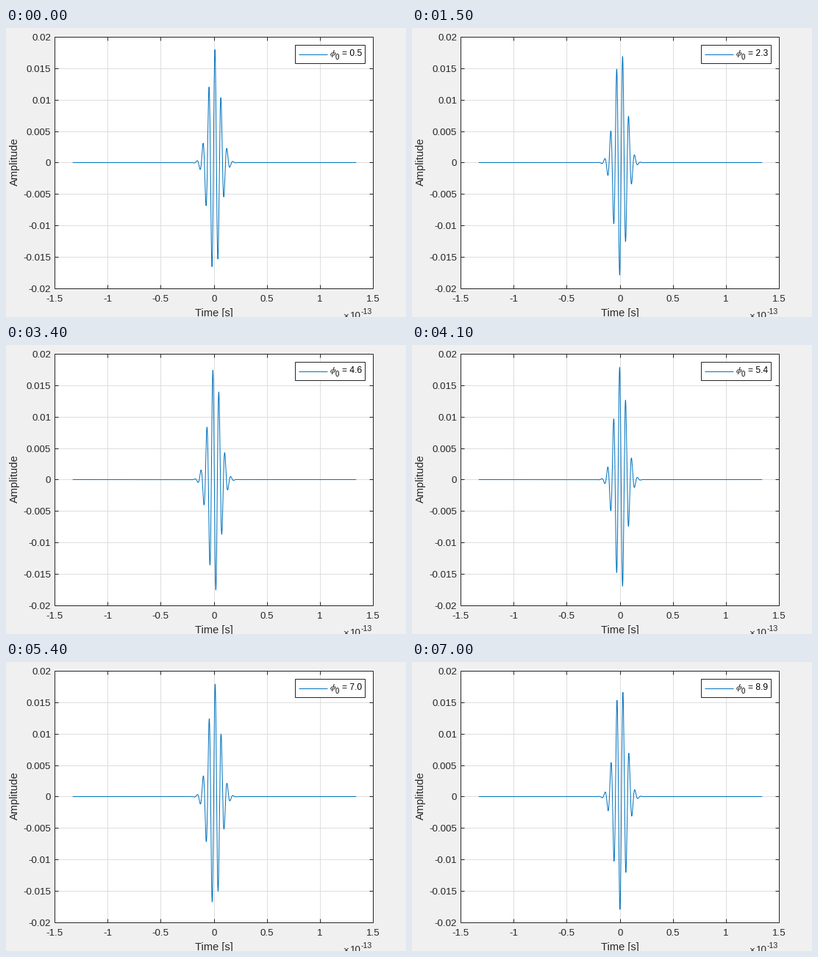
Write a matplotlib script that moves like this. It is 544 px wide and 394 px high and loops after 7100 ms.

```python
import numpy as np
import matplotlib.pyplot as plt
from matplotlib.animation import FuncAnimation
from matplotlib.patches import Rectangle

W, H, DPI = 544, 394, 64
FRAMES, INTERVAL = 71, 100
PT = 72 / DPI  # points per pixel

INK, GRID, BLUE = "#262626", "#dedede", "#0072bd"
# Straight lines use whole pixel indices; snapping centres them on the pixel.
LEFT, RIGHT, TOP, BOTTOM = 66, 499, 12, 355
X0, Y0 = 283.5, 183.5
X_UNIT = 144.6                     # pixels per 1e-13 s
Y_UNIT = (BOTTOM - TOP) / 0.04     # pixels per unit of amplitude

PEAK, PERIOD, WIDTH = 0.018, 0.0567, 0.081  # times in 1e-13 s

plt.rcParams["font.family"] = "Liberation Sans"
plt.rcParams["mathtext.fontset"] = "stix"

fig = plt.figure(figsize=(W / DPI, H / DPI), dpi=DPI, facecolor="#f0f0f0")
ax = fig.add_axes([0, 0, 1, 1])
ax.set_xlim(0, W)
ax.set_ylim(H, 0)
ax.axis("off")


def line(xs, ys, color=INK, z=2):
    return ax.plot(xs, ys, color=color, lw=PT, zorder=z,
                   solid_capstyle="butt")[0]


def text(x, y, s, px=13.33, color=INK, ha="left", **kw):
    return ax.text(x, y, s, fontsize=px * PT, color=color, ha=ha,
                   va="baseline", zorder=6, **kw)


def box(x0, y0, x1, y1, z, edge=INK, fill="white"):
    ax.add_patch(Rectangle((x0, y0), x1 - x0, y1 - y0, fc=fill, ec=edge,
                           lw=PT, zorder=z))


def draw_axes():
    box(LEFT, TOP, RIGHT, BOTTOM, 0, edge="none")
    box(LEFT, TOP, RIGHT, BOTTOM, 3, fill="none")
    tick = 5
    for n in range(7):
        x = np.floor(LEFT + n * (RIGHT - LEFT) / 6 + 0.5)
        if 0 < n < 6:
            line([x, x], [TOP, BOTTOM], GRID, 1)
            line([x, x], [TOP, TOP + tick])
            line([x, x], [BOTTOM, BOTTOM - tick])
        text(x, 373, f"{n / 2 - 1.5:g}", ha="center")
    for n in range(9):
        y = np.ceil(TOP + n * (BOTTOM - TOP) / 8 - 0.5)
        if 0 < n < 8:
            line([LEFT, RIGHT], [y, y], GRID, 1)
            line([LEFT, LEFT + tick], [y, y])
            line([RIGHT, RIGHT - tick], [y, y])
        text(61, y + 5, f"{(4 - n) * 0.005:g}", ha="right")
    text(283, 393, "Time [s]", 14.67, ha="center")
    text(16, 182.5, "Amplitude", 14.67, ha="center", rotation=90,
         rotation_mode="anchor")
    text(458, 396, "×")
    text(467.5, 396, "10")
    text(483, 390, "-13", 10.67)


def draw_legend():
    box(393, 23, 488, 48, 4)
    line([398, 437], [36, 36], BLUE, 5)
    text(440, 38, r"$\phi$", 12, "black")
    text(448, 43, "0", 9.6, "black")
    return text(457, 38, "", 12, "black")


draw_axes()
value = draw_legend()
t = np.linspace(-1.333, 1.333, 3201)
envelope = PEAK * np.exp(-(t / WIDTH) ** 2)
pulse = line(X0 + t * X_UNIT, np.full_like(t, Y0), BLUE, 4)
pulse.set_snap(False)


def update(i):
    # phase advances in whole tenths, 12 tenths per 10 frames
    phase = 0.5 + (12 * i + 5) // 10 / 10
    wave = envelope * np.cos(2 * np.pi * t / PERIOD - phase)
    pulse.set_ydata(Y0 - wave * Y_UNIT)
    value.set_text(f"= {phase:.1f}")
    return pulse, value


anim = FuncAnimation(fig, update, frames=FRAMES, interval=INTERVAL,
                     repeat=True, repeat_delay=0)
plt.show()
```
